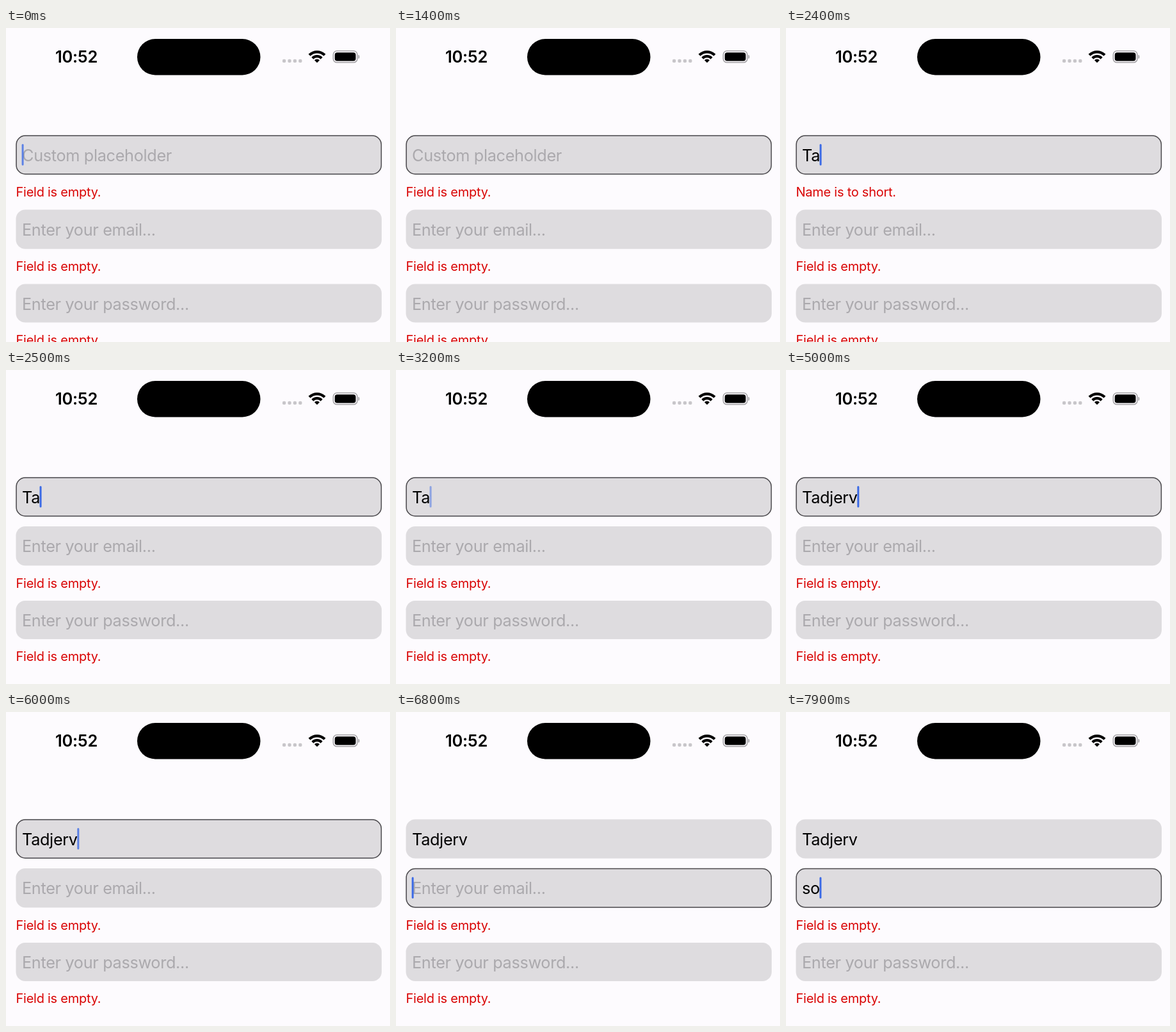
Recreate the animation shown at these times as an HTML page with a canvas. Size 600 by 490 pixels, loop 8000 ms.

```html
<!DOCTYPE html>
<html lang="en">
<head>
<meta charset="utf-8">
<title>Form validation</title>
<style>
  html, body { margin: 0; width: 600px; height: 490px; overflow: hidden; background: #fdfbfe; }
  canvas { display: block; }
</style>
</head>
<body>
<canvas id="stage" width="600" height="490"></canvas>
<script>
const ctx = document.getElementById('stage').getContext('2d');
const LOOP = 8000, STEP = 100;
const SANS = 'Inter, "Open Sans", sans-serif';
const LEFT = 15.5, TEXT_X = 25, WIDTH = 571.5;

const NAME = 'Tadjerv', EMAIL = 'so';
const nameKeys = [1600, 2400, 3900, 4100, 4300, 4500, 4900];
const emailKeys = [7800, 7900];
const FOCUS_EMAIL = 6700, EMAIL_CURSOR = 6800;
const SHORT_ERROR = 1700, NAME_VALID = 2500;

// The caret holds for a while after each restart, then cycles through these opacities.
const HOLD = 500, BLINK = [0.8, 0, 0, 0.5, 1, 1];
const caretRestarts = [-500, ...nameKeys, EMAIL_CURSOR, ...emailKeys];

const typed = (word, keys, t) => word.slice(0, keys.filter(k => k <= t).length);

function caretAlpha(t) {
  const idle = t - caretRestarts.filter(r => r <= t).pop() - HOLD;
  return idle < 0 ? 1 : BLINK[Math.floor(idle / STEP) % BLINK.length];
}

function rounded(x, y, w, h, r, fill, stroke, line) {
  ctx.beginPath();
  ctx.roundRect(x, y, w, h, r);
  if (fill) { ctx.fillStyle = fill; ctx.fill(); }
  if (stroke) { ctx.strokeStyle = stroke; ctx.lineWidth = line; ctx.stroke(); }
}

function label(text, x, y, color, size, spacing, weight = 400) {
  ctx.font = `${weight} ${size}px ${SANS}`;
  ctx.letterSpacing = spacing + 'px';
  ctx.fillStyle = color;
  ctx.fillText(text, x, y);
  return ctx.measureText(text).width;
}

function wifi(x, y) {
  const from = -Math.PI * 0.75, to = -Math.PI * 0.25;
  ctx.fillStyle = '#000';
  for (const [inner, outer] of [[0, 5.8], [8, 12.2], [14.8, 19]]) {
    ctx.beginPath();
    ctx.arc(x, y, outer, from, to);
    ctx.arc(x, y, inner, to, from, true);
    ctx.fill();
  }
}

function statusBar() {
  ctx.textAlign = 'center';
  label('10:52', 110, 54, '#000', 25.5, -0.2, 600);
  ctx.textAlign = 'left';
  rounded(205, 17, 192.5, 56.5, 28.25, '#000');
  for (let i = 0; i < 4; i++) rounded(432 + i * 8.4, 48.7, 5.2, 5.4, 1.8, '#c8c6ca');
  wifi(486, 54.3);
  rounded(511.3, 35.8, 37.6, 18, 5.8, null, '#a5a3a7', 1.5);
  rounded(513.7, 38.2, 32.8, 13.3, 3.8, '#000');
  rounded(550.4, 42, 1.9, 5.8, [0, 1.9, 1.9, 0], '#a5a3a7');
}

function field({ top, height, value = '', hint, focused, error, errorY, caret = 0 }) {
  rounded(LEFT, top, WIDTH, height, 14.5, '#dedcdf');
  if (focused) rounded(LEFT + 0.6, top + 0.6, WIDTH - 1.2, height - 1.2, 14, null, '#4b494d', 1.5);
  const width = label(value || hint, TEXT_X, top + 40.2, value ? '#000' : '#aba9ad', 25.3, -0.35);
  if (caret) {
    ctx.globalAlpha = caret;
    rounded(TEXT_X - 0.4 + (value ? width : 0), top + 13.5, 3, 33.5, 1.5, '#3b6ae6');
    ctx.globalAlpha = 1;
  }
  if (error) label(error, LEFT, errorY, '#d90404', 20, -0.25);
}

function draw(t) {
  const name = typed(NAME, nameKeys, t);
  const email = typed(EMAIL, emailKeys, t);
  const onEmail = t >= FOCUS_EMAIL;
  const shift = t >= NAME_VALID ? 39.5 : 0;
  const caret = caretAlpha(t);
  const empty = 'Field is empty.';

  ctx.fillStyle = '#fdfbfe';
  ctx.fillRect(0, 0, 600, 490);
  statusBar();
  field({
    top: 167.5, height: 61, value: name, hint: 'Custom placeholder',
    focused: !onEmail, caret: onEmail ? 0 : caret, errorY: 263,
    error: t >= NAME_VALID ? '' : t >= SHORT_ERROR ? 'Name is to short.' : empty
  });
  field({
    top: 283.5 - shift, height: 61.3, value: email, hint: 'Enter your email...',
    focused: onEmail, caret: onEmail ? caret : 0, errorY: 379 - shift, error: empty
  });
  field({
    top: 399.6 - shift, height: 60, hint: 'Enter your password...',
    errorY: 493.5 - shift, error: empty
  });
}

const start = performance.now();
function tick() {
  const t = (performance.now() - start) % LOOP;
  draw(Math.floor(t / STEP) * STEP);
  requestAnimationFrame(tick);
}
tick();
</script>
</body>
</html>
```
